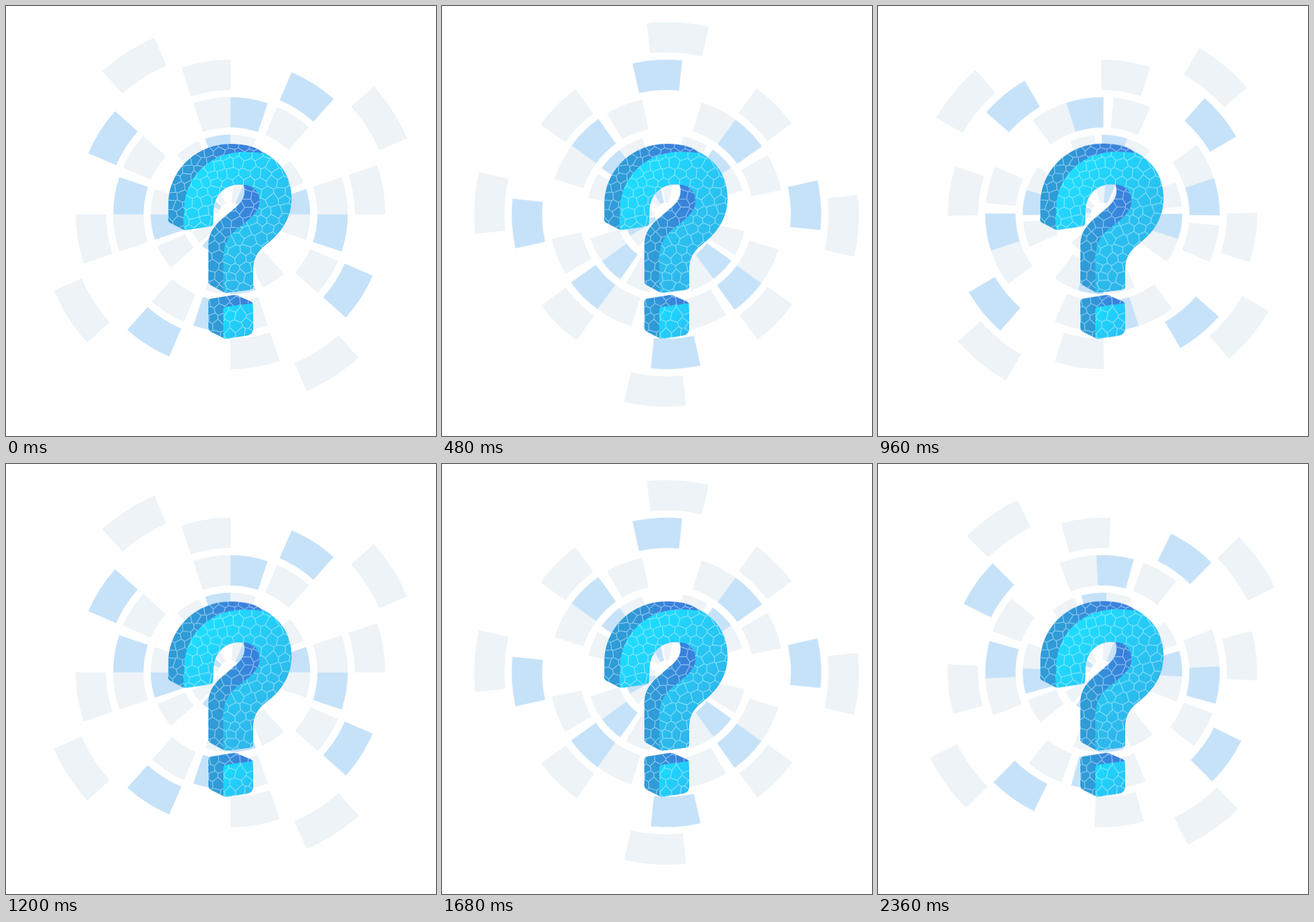
Animation of 748x748 px, one loop 2400 ms. Source, as an HTML page:

```html
<!DOCTYPE html>
<html lang="en">
<head>
<meta charset="utf-8">
<title>Question mark</title>
<style>
  html, body { margin: 0; width: 100%; height: 100%; overflow: hidden; background: #fff; }
  svg { display: block; width: 100vw; height: 100vh; }
  .ring { transform-origin: 390.5px 362.5px; animation: spin 2.4s steps(60) infinite; }
  .ring.back { animation-name: spin-back; }
  .mark { transform-origin: 390px 578px; animation: grow 2.4s steps(60) infinite; }
  .mesh { fill: none; stroke: #d8f4ff; stroke-opacity: .55; stroke-width: 1.4; stroke-linejoin: round; }
  @keyframes spin { to { transform: rotate(180deg); } }
  @keyframes spin-back { to { transform: rotate(-180deg); } }
  @keyframes grow { to { transform: scaleY(1.004); } }
</style>
</head>
<body>
<svg viewBox="0 0 748 748">
  <defs>
    <linearGradient id="sideFill" gradientUnits="userSpaceOnUse" x1="345" y1="335" x2="418" y2="312">
      <stop offset="0" stop-color="#2f9bd7"/>
      <stop offset="1" stop-color="#3a81dc"/>
    </linearGradient>
    <linearGradient id="dotSideFill" gradientUnits="userSpaceOnUse" x1="370" y1="532" x2="412" y2="511">
      <stop offset="0" stop-color="#2f9bd7"/>
      <stop offset="1" stop-color="#3a81dc"/>
    </linearGradient>
    <linearGradient id="frontFill" gradientUnits="userSpaceOnUse" x1="335" y1="300" x2="465" y2="420">
      <stop offset="0" stop-color="#1edcff"/>
      <stop offset="1" stop-color="#2db7eb"/>
    </linearGradient>
    <linearGradient id="dotFill" gradientUnits="userSpaceOnUse" x1="380" y1="530" x2="430" y2="572">
      <stop offset="0" stop-color="#19dbff"/>
      <stop offset="1" stop-color="#2cbdf2"/>
    </linearGradient>
    <clipPath id="sideClip">
      <path id="body" d="M282 372Q282 375 285 377L307 388.5Q310 390 314 389.5L355 383.5Q360 382.5 360 378L361 355
        C362 328 382 311 404 310.5L413 311C417 324 415 334 405 345C394 356 378 367 367 379C357 390 352 401 352 416
        L352 480Q352 483 355 485L377 497Q381 499 386 498.5L425 493.5Q430 492.5 430 487L430 456
        C430 440 437 427 452 415C478 396 496.5 369 496.5 335C496.5 298 479 273 452 257L438 249
        C424 242 408 240 390 240C330 240 282.5 287 282.5 345Z"/>
      <path id="dot" d="M352 515Q352 510 357 509L394 503Q399 502 403 504L426 514Q430 516 430 520L430 560
        Q430 571 420 573L387 578.5Q382 579.5 378 577.5L357 567Q352 564 352 559Z"/>
    </clipPath>
    <clipPath id="frontClip">
      <path id="bodyFront" d="M309 389L310 352C312 295 357 254 414 254C430 254 442 255 452 257
        C479 273 496.5 298 496.5 335C496.5 369 478 396 452 415C437 427 430 440 430 456
        L430 487Q430 492.5 425 493.5L386 498.5Q381 499 378 497L378 440
        C378 415 387 400 402 388C424 371 441 358 441 340C441 322 430 312 413 311L404 310.5
        C382 311 362 328 361 355L360 378Q360 382.5 355 383.5L314 389.5Q311 390 309 389Z"/>
      <path id="dotFront" d="M378 577.5L378 529Q378 524 383 523.5L430 517L430 560Q430 571 420 573L387 578.5Q382 579.5 378 577.5Z"/>
    </clipPath>
  </defs>
  <g id="rings"></g>
  <g class="mark">
    <use href="#body" fill="url(#sideFill)"/>
    <use href="#dot" fill="url(#dotSideFill)"/>
    <path id="sideMesh" class="mesh" clip-path="url(#sideClip)"/>
    <use href="#bodyFront" fill="url(#frontFill)"/>
    <use href="#dotFront" fill="url(#dotFill)"/>
    <path id="frontMesh" class="mesh" clip-path="url(#frontClip)"/>
  </g>
</svg>
<script>
  const GRAY = '#edf3f7', BLUE = '#c6e2f9', ARC = 18.5, DEPTH = 52.8;

  // Outer radius, direction, start angles of the gray and blue blocks (repeated every 90 degrees)
  const rings = [
    [334.5, 1, [-41.8], []],
    [269.2, -1, [-18.5], [23.3]],
    [204, 1, [-18.5, 23.5], [0]],
    [138.7, -1, [-42, 0], [-18.5]],
    [73.4, 1, [5, 47], [23.5]]
  ];

  // Point at an angle measured clockwise from the top
  function polar(r, deg) {
    const a = deg * Math.PI / 180;
    return `${(390.5 + r * Math.sin(a)).toFixed(2)} ${(362.5 - r * Math.cos(a)).toFixed(2)}`;
  }

  function block(r, a) {
    const b = a + ARC, inner = r - DEPTH;
    return `M${polar(r, a)}A${r} ${r} 0 0 1 ${polar(r, b)}L${polar(inner, b)}A${inner} ${inner} 0 0 0 ${polar(inner, a)}Z`;
  }

  const blocks = (r, color, starts) => `<path fill="${color}" d="${
    starts.flatMap(a => [0, 90, 180, 270].map(turn => block(r, a + turn))).join('')}"/>`;

  document.getElementById('rings').innerHTML = rings.map(([r, dir, gray, blue]) =>
    `<g class="ring${dir < 0 ? ' back' : ''}">${blocks(r, GRAY, gray)}${blocks(r, BLUE, blue)}</g>`).join('');

  function random(seed) {
    return () => (seed = seed * 16807 % 2147483647) / 2147483647;
  }

  // Keep the part of a polygon that is nearer to site p than to site q
  function cut(poly, p, q) {
    const nx = q.x - p.x, ny = q.y - p.y;
    const side = v => (v.x - (p.x + q.x) / 2) * nx + (v.y - (p.y + q.y) / 2) * ny;
    const out = [];
    poly.forEach((a, i) => {
      const b = poly[(i + 1) % poly.length], da = side(a), db = side(b);
      if (da <= 0) out.push(a);
      if (da * db < 0) {
        const t = da / (da - db);
        out.push({ x: a.x + (b.x - a.x) * t, y: a.y + (b.y - a.y) * t });
      }
    });
    return out;
  }

  // Voronoi cells around a jittered hexagonal lattice
  function mesh(step, seed) {
    const rnd = random(seed), sites = [];
    const jitter = () => (rnd() - .5) * step * .55;
    for (let y = 225, row = 0; y < 600; y += step * .87, row++)
      for (let x = 265 + row % 2 * step / 2; x < 515; x += step)
        sites.push({ x: x + jitter(), y: y + jitter() });
    const reach = step * 3;
    return sites.map(p => {
      let poly = [[-1, -1], [1, -1], [1, 1], [-1, 1]].map(([x, y]) => ({ x: p.x + x * step, y: p.y + y * step }));
      for (const q of sites)
        if (q !== p && Math.hypot(q.x - p.x, q.y - p.y) < reach) poly = cut(poly, p, q);
      // Each shared edge is drawn once
      return poly.map((a, i) => {
        const b = poly[(i + 1) % poly.length];
        return a.y < b.y ? `M${a.x.toFixed(1)} ${a.y.toFixed(1)}L${b.x.toFixed(1)} ${b.y.toFixed(1)}` : '';
      }).join('');
    }).join('');
  }

  document.getElementById('sideMesh').setAttribute('d', mesh(17.5, 71));
  document.getElementById('frontMesh').setAttribute('d', mesh(19, 2024));
</script>
</body>
</html>
```
